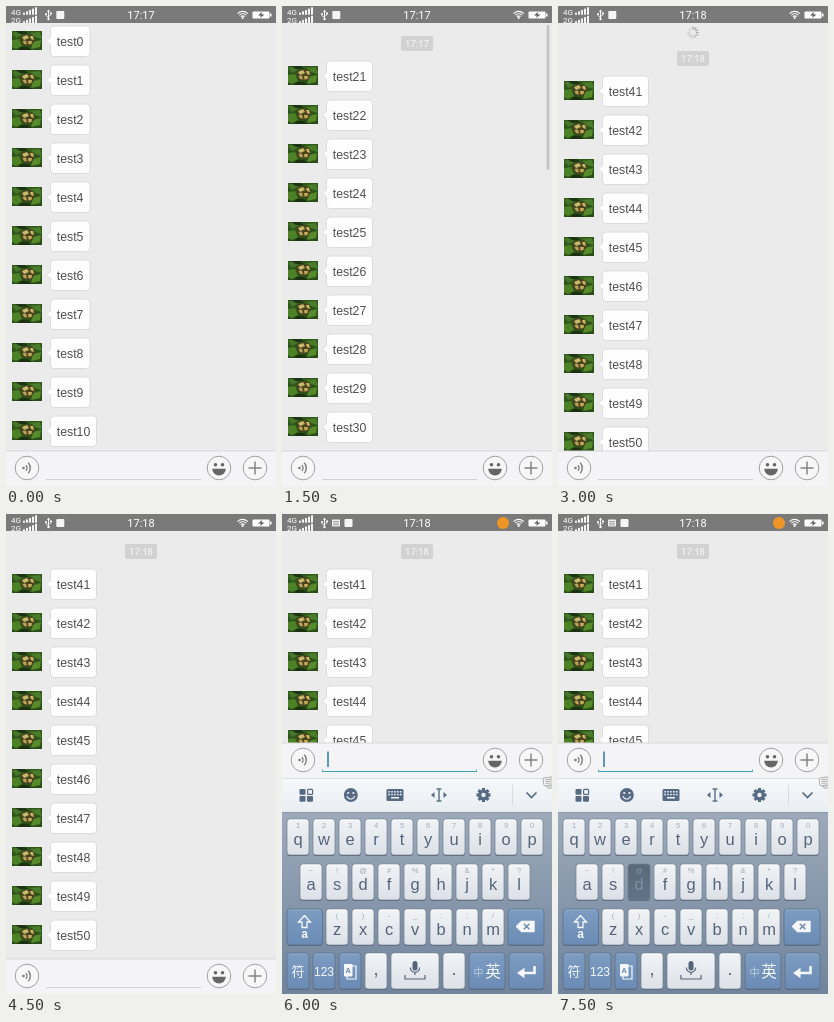
Write an HTML page with a canvas that moves like this. It is 270 px wide and 480 px high and loops after 8000 ms.

```html
<!DOCTYPE html>
<html lang="en">
<head>
<meta charset="utf-8">
<title>Chat list</title>
<style>
html, body { margin: 0; width: 100%; height: 100%; overflow: hidden; background: #ebebeb; }
canvas { display: block; width: 100vw; height: 100vh; }
</style>
</head>
<body>
<canvas id="stage"></canvas>
<script>
const W = 270, H = 480, STEP = 1500, LOOP = 8000;
const SANS = '"Liberation Sans", Arial, sans-serif';
const ROBOTO = 'Roboto, sans-serif';
const CJK = '"Noto Sans CJK SC", "Noto Sans CJK", sans-serif';
const canvas = document.getElementById('stage');
const ctx = canvas.getContext('2d');

// Each scene: first message, its centre line, row count, clock and extras
const scenes = [
  { first: 0, y: 35, rows: 11, clock: '17:17' },
  { first: 21, y: 70, rows: 10, clock: '17:17', label: true, scrollbar: true },
  { first: 41, y: 85, rows: 10, clock: '17:18', label: true, spinner: true },
  { first: 41, y: 70, rows: 10, clock: '17:18', label: true },
  { first: 41, y: 70, rows: 5, clock: '17:18', label: true, keyboard: true },
  { first: 41, y: 70, rows: 5, clock: '17:18', label: true, keyboard: true, pressed: 'd' }
];

function rect(x, y, w, h, fill) {
  ctx.fillStyle = fill;
  ctx.fillRect(x, y, w, h);
}

function box(x, y, w, h, r, fill, stroke, lw = 1) {
  ctx.beginPath();
  ctx.roundRect(x, y, w, h, r);
  paint(fill, stroke, lw);
}

function circle(x, y, r, fill, stroke, lw = 1) {
  ctx.beginPath();
  ctx.arc(x, y, r, 0, Math.PI * 2);
  paint(fill, stroke, lw);
}

function path(points, fill, stroke, lw = 1) {
  ctx.beginPath();
  points.forEach(([x, y], i) => i ? ctx.lineTo(x, y) : ctx.moveTo(x, y));
  if (fill) ctx.closePath();
  paint(fill, stroke, lw);
}

function arc(x, y, r, from, to, stroke, lw = 1) {
  ctx.beginPath();
  ctx.arc(x, y, r, from, to);
  paint(null, stroke, lw);
}

function paint(fill, stroke, lw) {
  if (fill) { ctx.fillStyle = fill; ctx.fill(); }
  if (stroke) { ctx.strokeStyle = stroke; ctx.lineWidth = lw; ctx.stroke(); }
}

function text(s, x, y, size, fill, align = 'center', family = SANS, weight = 400) {
  ctx.font = `${weight} ${size}px ${family}`;
  ctx.textAlign = align;
  ctx.textBaseline = 'alphabetic';
  ctx.fillStyle = fill;
  ctx.fillText(s, x, y);
}

function at(x, y, draw) {
  ctx.save();
  ctx.translate(x, y);
  draw();
  ctx.restore();
}

function gradient(y, h, top, bottom) {
  const g = ctx.createLinearGradient(0, y, 0, y + h);
  g.addColorStop(0, top);
  g.addColorStop(1, bottom);
  return g;
}

function statusBar(scene) {
  rect(0, 0, W, 17, '#7a7a7a');
  [['4G', 1.5], ['2G', 10]].forEach(([name, y]) => {
    text(name, 5, y + 7, 8, '#fff', 'left', ROBOTO);
    for (let i = 0; i < 5; i++) {
      const h = 2 + i * 1.35;
      rect(17 + i * 3, y + 7.2 - h, 2, h, '#f5f5f5');
    }
  });
  usb(42.5, 9);
  if (scene.keyboard) {
    box(50, 5.5, 8, 7, 1, '#f2f2f2');
    for (let i = 0; i < 3; i++) rect(51, 7 + i * 1.8, 6, 0.7, '#858585');
    box(62.5, 5, 8, 8, 1, '#f5f5f5');
    circle(221, 9, 6, '#ef9526');
  } else {
    box(50.3, 5, 8, 8, 1, '#f5f5f5');
  }
  text(scene.clock, 135, 13, 11, '#fff', 'center', ROBOTO);
  [2.3, 4.6, 6.9].forEach(r => arc(236.7, 12.3, r, -Math.PI * 0.77, -Math.PI * 0.23, '#fff', 1.1));
  circle(236.7, 12, 1.1, '#fff');
  box(246.5, 5.5, 17, 7, 1, '#fff');
  rect(264, 7.5, 1.5, 3, '#fff');
  path([[256, 6], [252, 9.5], [255, 9.5], [254, 12], [258.5, 8.5], [255.5, 8.5]], '#555');
}

function usb(x, y) {
  at(x, y, () => {
    path([[0, 4], [0, -4]], null, '#fff');
    path([[0, 2.5], [-2.5, 0.7], [-2.5, -1]], null, '#fff', 0.8);
    path([[0, 1.3], [2.5, -0.2], [2.5, -2]], null, '#fff', 0.8);
    path([[-1.5, -3], [0, -5.5], [1.5, -3]], '#fff');
    circle(0, 4, 1.2, '#fff');
    circle(-2.5, -1, 1, '#fff');
    rect(1.6, -2.6, 1.8, 1.8, '#fff');
  });
}

// Soft stand-in for the leafy photograph
function avatar(x, y) {
  at(x, y, () => {
    ctx.beginPath();
    ctx.rect(0, 0, 30, 19);
    ctx.clip();
    rect(0, 0, 30, 19, gradient(0, 19, '#2f5a1a', '#2a4d17'));
    path([[0, 2], [5, 0], [10, 4], [4, 7]], '#47752a');
    path([[18, 2], [28, 1], [30, 8], [23, 6]], '#4b7c2a');
    path([[0, 9], [7, 8], [10, 15], [4, 18], [0, 16]], '#4d8126');
    path([[21, 11], [29, 9], [28, 16], [19, 18]], '#568a2b');
    path([[3, 0], [13, 0], [16, 3], [8, 3]], '#1c3512');
    path([[9, 16], [15, 16], [20, 19], [6, 19]], '#1a3010');
    path([[9, 5], [15, 3], [21, 4], [23, 9], [20, 14], [13, 15], [9, 11]], '#4a4320');
    path([[10, 6], [15, 4], [17, 7], [12, 9]], '#c9ba6c');
    path([[18, 5], [21, 5], [22, 9], [19, 8]], '#cdb763');
    path([[10.5, 10], [14, 9.5], [15, 13.5], [12, 13]], '#b9a355');
    path([[16, 10], [20, 10], [19.5, 13], [16.5, 13.5]], '#c4ab5c');
  });
}

function message(n, y) {
  const w = n < 10 ? 39.5 : 46;
  avatar(6, y - 10);
  box(44.5, y - 15, w, 30.5, 3.5, '#fefefe', '#dadada', 0.9);
  path([[45.2, y - 3.8], [40.5, y], [45.2, y + 3.8]], '#fafafa');
  path([[44.5, y - 3.8], [40.5, y], [44.5, y + 3.8]], null, '#dddddd', 0.7);
  text('test' + n, 50.8, y + 4.8, 12.3, '#505050', 'left');
}

function chat(scene) {
  rect(0, 17, W, H - 17, '#ebebeb');
  for (let i = 0; i < scene.rows; i++) message(scene.first + i, scene.y + i * 39);
  if (scene.label) {
    const y = scene.y - 40;
    box(119, y, 32, 15, 2, '#d2d2d2');
    text(scene.clock, 135, y + 11, 9.6, '#f8f8f8', 'center', ROBOTO);
  }
  if (scene.scrollbar) rect(264.7, 19, 2.6, 144.5, '#c2c2c2');
  if (scene.spinner) at(135, 26.5, () => {
    for (let i = 0; i < 12; i++) {
      const g = 150 + i * 6;
      path([[0, -3], [0, -6]], null, `rgb(${g},${g},${g})`, 1.1);
      ctx.rotate(Math.PI / 6);
    }
  });
}

function inputBar(y, active) {
  const ink = '#7c7c7c';
  rect(0, y, W, 36, '#f4f4f6');
  rect(0, y - 0.5, W, 1, '#d9d9db');
  at(0, y + 17, () => {
    [21, 213, 249].forEach(x => circle(x, 0, 11.8, '#f7f7f8', '#979797', 0.9));
    circle(17.5, 0, 1.3, ink);
    [4, 7.3].forEach(r => arc(17, 0, r, -0.78, 0.78, ink, 1.4));
    circle(209.5, -3.2, 1.8, '#666');
    circle(216.5, -3.2, 1.8, '#666');
    ctx.beginPath();
    ctx.arc(213, 0.8, 6.8, 0, Math.PI);
    ctx.closePath();
    paint('#666');
    rect(242.5, -0.7, 13, 1.4, ink);
    rect(248.3, -6.5, 1.4, 13, ink);
  });
  rect(40, y + 28, 155, 1, active ? '#469fc0' : '#d2d2d4');
  if (active) {
    rect(40, y + 26.5, 0.8, 2, '#469fc0');
    rect(194.2, y + 26.5, 0.8, 2, '#469fc0');
    rect(45.2, y + 8.5, 1.6, 15.5, '#3a80b2');
  }
}

function key(x, y, w, opts = {}) {
  const { blue, down } = opts;
  const fill = down ? gradient(y, 36, '#5a697b', '#627287')
    : blue ? gradient(y, 36, '#7d9cc2', '#6a8bb4')
    : gradient(y, 36, '#f1f3f6', '#dce1e8');
  box(x, y + 1, w, 36, 3, '#5b6b7e');
  box(x, y, w, 36, 3, fill, blue ? '#586f8c' : '#717f90', 0.7);
  if (!down) rect(x + 2, y + 0.7, w - 4, 0.7, blue ? '#98b0cc' : '#fff');
}

function letters(row, hints, x, y, pressed) {
  [...row].forEach((c, i) => {
    const kx = x + i * 26, mid = kx + 11, down = c === pressed;
    key(kx, y, 22, { down });
    text(hints[i], mid, y + 8.5, 7.5, down ? '#8593a4' : '#a3abb5');
    text(c, mid, y + 25.5, 16.5, down ? '#8090a2' : '#56637a');
  });
}

function toolbar() {
  const ink = '#566a84', paper = '#eff3f7';
  rect(0, 264, W, 34, gradient(264, 34, '#f6f8fa', '#e9eef3'));
  rect(0, 264, W, 0.8, '#d5dae0');
  [[17.5, 275], [25, 275], [17.5, 282], [25, 282]].forEach(([x, y], i) =>
    i === 1 ? box(x + 0.6, y + 0.4, 5, 5, 1, null, ink, 1.2) : box(x, y, 6, 5.8, 1, ink));
  circle(68.8, 281, 7, ink);
  circle(66.2, 279, 1.1, paper);
  circle(71.4, 279, 1.1, paper);
  arc(68.8, 281, 4, 0.3, Math.PI - 0.3, paper, 1.2);
  box(104.5, 275, 17, 12, 1.5, ink);
  for (let r = 0; r < 2; r++)
    for (let i = 0; i < 5; i++) rect(106.3 + i * 2.9, 277 + r * 2.8, 1.6, 1.5, paper);
  rect(109, 283, 8, 1.5, paper);
  path([[157, 275], [157, 287]], null, ink, 1.4);
  [275, 287].forEach(y => path([[154.5, y], [159.5, y]], null, ink, 1.4));
  [-1, 1].forEach(s => path([[157 + s * 4.5, 278], [157 + s * 8, 281], [157 + s * 4.5, 284]], ink));
  at(201.5, 281, () => {
    for (let i = 0; i < 8; i++) {
      rect(-1.6, -7, 3.2, 4, ink);
      ctx.rotate(Math.PI / 4);
    }
    circle(0, 0, 5.3, ink);
    circle(0, 0, 2.2, paper);
  });
  rect(230, 271, 0.8, 20, '#cfd6de');
  path([[244.5, 278.5], [249.5, 283.5], [254.5, 278.5]], null, ink, 1.7);
  at(261, 264, () => {
    ctx.rotate(-0.12);
    box(0, 0, 11, 8, 1, '#f5f5f5', '#a5a5a5', 0.8);
    for (let i = 0; i < 3; i++) rect(2, 1.6 + i * 2, 7, 0.8, '#a5a5a5');
    path([[2, 8], [10, 8], [8, 11], [4, 11]], '#d8d8d8', '#a5a5a5', 0.6);
  });
}

function keyboard(pressed) {
  toolbar();
  rect(0, 298, W, 182, gradient(298, 182, '#9caabb', '#71849b'));
  rect(0, 298, W, 0.8, '#8595a7');
  letters('qwertyuiop', '1234567890', 5, 305, pressed);
  letters('asdfghjkl', "~!@#%'&*?", 18, 350, pressed);
  letters('zxcvbnm', '()-_:;/', 44, 395, pressed);
  const blue = { blue: true }, white = '#f6f8fb', ink = '#566379';

  key(5, 395, 35.5, blue);
  path([[22.5, 401.5], [28.5, 408], [25, 408], [25, 413.5], [20, 413.5], [20, 408], [16.5, 408], [22.5, 401.5]], null, white, 1.3);
  text('a', 22.5, 424, 12, white, 'center', SANS, 700);
  key(226, 395, 36, blue);
  ctx.lineJoin = 'round';
  path([[234.5, 412.5], [239.5, 407.5], [252, 407.5], [252, 417.5], [239.5, 417.5]], white, white, 1.4);
  ctx.lineJoin = 'miter';
  path([[241.8, 409.7], [247.4, 415.3]], null, '#6c88aa', 1.4);
  path([[247.4, 409.7], [241.8, 415.3]], null, '#6c88aa', 1.4);

  key(5, 439, 22, blue);
  text('符', 16, 462, 13, white, 'center', CJK);
  key(31, 439, 22, blue);
  text('123', 42, 461.5, 12, white);
  key(57, 439, 22, blue);
  path([[70, 452], [74, 452], [74, 465], [65, 465], [65, 462]], null, white, 1.2);
  box(62, 450, 8.5, 12.5, 1, white);
  text('A', 66.2, 459, 7.5, '#6b88ae', 'center', SANS, 700);
  key(83, 439, 22);
  text(',', 94, 461, 18, ink);
  key(109, 439, 48);
  box(130.5, 447, 5, 9.5, 2.5, ink);
  arc(133, 453.5, 4.7, 0, Math.PI, ink, 1.1);
  path([[133, 458], [133, 461]], null, ink, 1.2);
  path([[123, 461], [123, 465], [143, 465], [143, 461]], null, ink, 1.2);
  key(161, 439, 22);
  text('.', 172, 461, 18, ink);
  key(187, 439, 36, blue);
  text('中', 196.5, 461.5, 10, '#c0cfe1', 'center', CJK);
  text('英', 211, 463, 15.5, white, 'center', CJK);
  key(227, 439, 35, blue);
  path([[252.5, 452], [252.5, 459], [241, 459]], null, white, 2.6);
  path([[235, 459], [242.5, 453.8], [242.5, 464.2]], white);
}

function render(t) {
  const scene = scenes[Math.floor(t / STEP)];
  const w = Math.round(innerWidth * devicePixelRatio), h = Math.round(innerHeight * devicePixelRatio);
  if (canvas.width !== w || canvas.height !== h) {
    canvas.width = w;
    canvas.height = h;
  }
  ctx.setTransform(w / W, 0, 0, h / H, 0, 0);
  chat(scene);
  inputBar(scene.keyboard ? 229 : 445, scene.keyboard);
  if (scene.keyboard) keyboard(scene.pressed);
  statusBar(scene);
}

const start = performance.now();
function tick() {
  render((performance.now() - start) % LOOP);
  requestAnimationFrame(tick);
}
tick();
</script>
</body>
</html>
```
